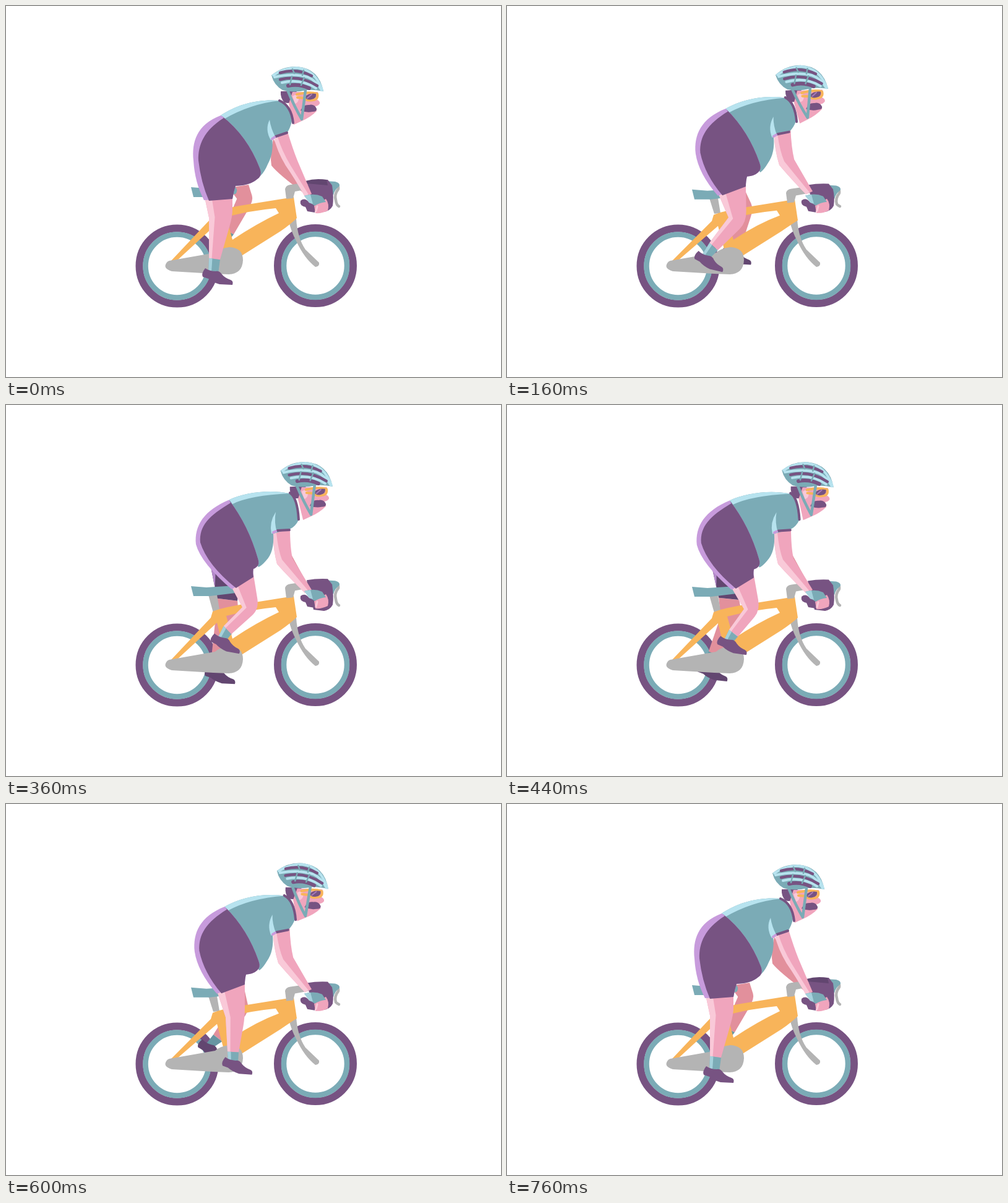
An HTML page with a canvas for the animation above (0.8 s loop, 800 px wide and 600 px high).

```html
<!DOCTYPE html>
<html lang="en">
<head>
<meta charset="utf-8">
<title>Cyclist</title>
<style>
html, body { margin: 0; width: 100%; height: 100%; overflow: hidden; background: #fff; }
canvas { display: block; }
</style>
</head>
<body>
<canvas id="stage" width="800" height="600"></canvas>
<script>
const ctx = document.getElementById('stage').getContext('2d');
const LOOP = 800, STEP = 40, TURN = 760;
const purple = '#775382', dark = '#624670', violet = '#c79bdc', teal = '#7babb6', ice = '#b7e3ef',
  pink = '#f0a5bd', blush = '#f9c9d8', rose = '#e2909c', orange = '#f8b45a', gray = '#b4b4b4';

// time, back of knee, front of knee, ankle, shoe centre, shoe angle
const PEDAL = [
  [0,   328, 342, 366, 340, 337, 409, 341, 437, 0],
  [100, 345, 344, 379, 346, 332, 398, 325, 428, 5],
  [160, 358, 342, 387, 350, 334, 389, 326, 412, 10],
  [240, 370, 334, 399, 344, 345, 375, 335, 393, 15],
  [360, 382, 327, 409, 330, 358, 364, 354, 385, 8],
  [440, 383, 330, 409, 332, 366, 369, 363, 388, 5],
  [520, 380, 335, 406, 335, 371, 380, 368, 398, 0],
  [600, 355, 345, 386, 345, 367, 401, 373, 423, 2],
  [630, 348, 345, 380, 343, 362, 409, 366, 438, 1]
];
PEDAL.push([TURN, ...PEDAL[0].slice(1)]);

const lerp = (a, b, k) => a + (b - a) * k;
const between = (p, q, k) => [lerp(p[0], q[0], k), lerp(p[1], q[1], k)];
const poly = (...points) => 'M' + points.map(p => p.join(' ')).join('L') + 'Z';

// Blends two paths that share the same commands.
function mix(a, b, k) {
  const to = b.match(/-?[\d.]+/g);
  let i = 0;
  return a.replace(/-?[\d.]+/g, n => lerp(+n, +to[i++], k));
}

function fill(color, path, rule) {
  ctx.fillStyle = color;
  ctx.fill(new Path2D(path), rule || 'nonzero');
}

function line(color, width, path) {
  ctx.strokeStyle = color;
  ctx.lineWidth = width;
  ctx.stroke(new Path2D(path));
}

function group(x, y, angle, draw) {
  ctx.save();
  ctx.translate(x, y);
  ctx.rotate(angle * Math.PI / 180);
  draw();
  ctx.restore();
}

function pedalPose(t) {
  t = (t + TURN) % TURN;
  const i = PEDAL.findIndex(row => row[0] > t);
  const a = PEDAL[i - 1], b = PEDAL[i], k = (t - a[0]) / (b[0] - a[0]);
  return a.map((v, j) => lerp(v, b[j], k)).slice(1);
}

function wheel(x, y) {
  for (const [r, w, color] of [[61, 12, purple], [51, 8.6, teal]]) {
    ctx.strokeStyle = color;
    ctx.lineWidth = w;
    ctx.beginPath();
    ctx.arc(x, y, r, 0, 7);
    ctx.stroke();
  }
}

function leg(pose, hemBack, hemFront, far, dx = 0, dy = 0) {
  const [bx, by, fx, fy, ax, ay, sx, sy, angle] = pose;
  const back = [bx + dx, by + dy], front = [fx + dx, fy + dy];
  const mid = between(back, front, .5);
  const len = Math.hypot(ax - mid[0], ay - mid[1]);
  const nx = (ay - mid[1]) / len * 9, ny = (ax - mid[0]) / len * 9;
  const heel = [ax - nx, ay + ny], shin = [ax + nx, ay - ny];
  const sockBack = [sx - 14, sy - 4], sockFront = [sx + 2, sy - 4];
  const low = between(front, shin, .25), high = between(front, hemFront, .3);
  fill(far ? rose : pink,
    `M${hemBack}L${back}L${heel}L${shin}L${low}Q${front} ${high}L${hemFront}Z`);
  fill(far ? '#6795a2' : teal, poly(heel, shin, sockFront, sockBack));
  if (!far) {
    fill(blush, poly(hemBack, back, heel, between(heel, shin, .25),
      between(back, front, .25), between(hemBack, hemFront, .25)));
    fill('#a5d1dc', poly(heel, between(heel, shin, .3), between(sockBack, sockFront, .3), sockBack));
  }
  group(sx, sy, angle, () => fill(far ? dark : purple,
    'M-19 -13Q-12 -8 -2 -8Q4 -9 8 -3Q13 3 22 6Q27 8 25 14L4 13Q-7 10 -14 4L-23 1Q-26 -4 -19 -13Z'));
}

function bike(dip) {
  const y = v => v + 4 * dip;
  fill(gray, `M457 347L469 344Q471 375 484 394L506 415Q507 421 500 422Q482 408 469 380Q460 363 457 347Z`);
  fill(gray, `M327 ${y(307)}L341 ${y(307)}L345 ${y(331)}L335 336Z`);
  fill(orange, `M334 ${y(334)}Q345 ${y(329)} 378 ${y(323)}L465 ${y(309)}L470 ${y(343)}Q460 353 444 364L379 405
    L352 397L341 ${y(352)}L277 411L266 413L331 ${y(344)}Z
    M356 ${y(341)}Q395 ${y(331)} 436 ${y(327)}L441 ${y(335)}Q405 352 366 378Z`, 'evenodd');
  fill(gray, 'M264 412L338 399Q345 392 361 390Q383 391 383 411Q382 433 360 434L335 433L268 429Q255 425 258 418Q260 413 264 412Z');
  fill(teal, `M299 ${y(293)}L324 ${y(295)}L370 ${y(292)}Q376 ${y(298)} 371 ${y(304)}L330 ${y(309)}L303 ${y(309)}Z`);
}

function handlebar(dip, double) {
  const y = v => v + 7 * dip;
  fill(gray, `M453 ${y(312)}L451 ${y(296)}Q452 ${y(290)} 460 ${y(289)}L488 ${y(285)}L489 ${y(296)}L467 ${y(300)}L464 ${y(311)}Z`);
  line(gray, 4.5, `M531 ${y(291)}Q538 ${y(288)} 537 ${y(296)}Q530 ${y(305)} 533 ${y(314)}Q534 322 538 324`);
  fill(teal, `M516 ${y(283)}L532 ${y(284)}Q540 ${y(286)} 539 ${y(291)}Q531 ${y(297)} 529 ${y(306)}Z`);
  fill(purple, `M486 ${y(283)}Q503 ${y(280)} 520 ${y(281)}L527 ${y(290)}Q530 310 528 323Q524 331 514 333L497 331Z`);
  if (double) fill(dark, `M484 ${y(283)}Q500 ${y(278)} 518 ${y(281)}L520 ${y(290)}L486 ${y(287)}Z`);
}

function hand(lift) {
  group(0, lift, 0, () => {
    fill(purple, 'M476 315Q483 309 490 318L500 322L499 334L487 332L484 325Q474 323 476 315Z');
    fill(pink, 'M498 323L517 312Q523 320 520 331Q510 336 500 335Z');
    line(blush, 3, 'M503 324L501 332');
    fill(teal, 'M482 307Q498 302 511 308L517 317Q507 318 499 323L491 318Z');
    fill('#a5d1dc', 'M482 307L492 305L496 320L490 318Z');
  });
}

function head() {
  fill(purple, 'M444 138L470 137L466 152Q460 159 450 156Q443 149 444 138Z');
  fill(pink, 'M463 139L504 139L502 151Q508 154 507 158Q504 162 500 162L502 170Q492 180 478 186L465 192L457 158Z');
  fill(blush, 'M463 146Q470 141 473 147Q474 156 467 158Z');
  line(orange, 4, 'M470 143Q490 138 503 142Q505 151 496 152Q486 154 483 149L471 148');
  fill(purple, 'M483 147Q490 140 501 142Q502 150 494 151Q486 153 483 147Z');
  line('#a77bb9', 2, 'M487 149L494 143');
  fill(purple, 'M476 169Q480 159 490 160Q498 158 502 166Q503 171 495 171Q486 173 476 169Z');
  line(teal, 4.5, 'M455 136Q466 163 478 183L484 136');
  fill(teal, 'M429 112Q447 97 470 98Q506 101 513 138Q498 135 486 136Q465 141 447 136Q433 128 429 112Z');
  line(purple, 6, 'M456 129Q473 125 490 133');
  line(ice, 4, 'M432 112Q449 100 470 100Q500 103 511 136M434 115Q464 108 488 115Q502 121 510 136M446 124Q477 117 501 133');
  line(purple, 4.5, 'M443 108Q470 100 494 113M443 119Q474 111 503 129');
  line(teal, 2.5, 'M463 102L466 109M481 104L479 112M462 114L459 127M482 116L477 128');
}

function draw(t) {
  const swing = Math.sin(Math.PI * t / TURN) ** 2;
  const dip = Math.sin(2 * Math.PI * t / TURN) ** 2;
  const lean = swing ** .8;
  const tuck = swing ** .55;
  const bend = 1 - (1 - swing) ** 4;
  const body = (a, b) => mix(a, b, lean);
  const arm = (a, b) => mix(a, b, bend);

  ctx.fillStyle = '#fff';
  ctx.fillRect(0, 0, 800, 600);
  ctx.lineCap = ctx.lineJoin = 'round';

  wheel(276.5, 420.5);
  wheel(500, 420);

  // Far limbs
  fill(rose, arm('M432 215Q426 240 429 258Q440 272 482 303L490 295L455 250Z',
    'M440 215Q442 240 444 250Q450 268 484 300L490 295L460 240Z'));
  const farBack = between([360, 294], [341, 313], swing);
  const farFront = between([378, 285], [374, 317], swing);
  leg(pedalPose(t + TURN / 2), farBack, between([392, 289], [374, 317], swing), true,
    -9 + 17 * swing, -16 * (1 - swing));
  const hip = between([330, 250], [331, 262], swing);
  fill(dark, poly(hip, farBack, farFront, [378, 265]));
  fill('#b48aca', poly(hip, between(hip, farBack, .65), [hip[0] + 8, hip[1]]));

  bike(dip);
  handlebar(dip, bend < .5);

  // Near leg
  leg(pedalPose(t), between([321, 309], [364, 293], lean), between([366, 306], [400, 274], tuck));

  group(470 + 15 * swing ** .8, 160 - 6 * swing, -2.4 * Math.sin(2 * Math.PI * t / TURN), () => {
    ctx.translate(-470, -160);
    head();
  });

  // Near arm, under the sleeve
  fill(pink, arm('M432 205L454 200Q463 230 471 250L494 304L483 308Q466 278 452 258Q438 235 432 205Z',
    'M431 200L459 198Q459 230 463 248L494 299L483 304Q450 271 438 257Q432 235 431 200Z'));
  fill(blush, arm('M432 210L438 209Q446 235 460 258L489 305L483 308Q466 278 452 258Q438 235 432 210Z',
    'M431 208L437 207Q440 235 446 250L489 301L483 304Q450 271 438 257Q432 235 431 208Z'));

  // Jersey
  fill(teal, body('M347 177C372 160 405 150 443 153Q460 164 462 186Q460 196 455 204L430 214Q433 238 423 256Q418 268 411 275L370 240Z',
    'M361 153C385 142 425 136 458 143Q472 155 473 186Q468 196 460 200L432 208Q434 238 420 252Q413 260 408 262L380 225Z'));
  fill(ice, body('M347 177C372 160 405 150 443 153Q395 158 352 183Z',
    'M361 153C385 142 425 136 458 143Q395 146 366 160Z'));
  fill(ice, body('M426 184Q418 200 428 217L435 211Q428 198 426 184Z',
    'M436 173Q425 190 429 208L438 206Q433 190 436 173Z'));
  line(purple, 4, body('M436 211L454 205', 'M439 203L458 202'));
  line(violet, 4, body('M430 215L434 212', 'M432 206L436 204'));
  line(purple, 4, body('M442 153Q461 161 464 189', 'M459 142Q471 150 473 185'));

  // Shorts
  const seam = mix('L366 312Q368 300 371 291Q395 290 406 280Q415 274 410 262',
    'L400 278Q399 270 400 265Q403 264 406 261Q410 257 407 248', tuck);
  const waist = body('Q390 210 349 178Z', 'Q392 195 361 154Z');
  fill(violet, body('M347 177C308 192 300 220 303 250Q305 285 320 314',
    'M361 153C320 170 304 195 307 225Q315 255 365 298') + seam + waist);
  fill(purple, body('M352 181C320 201 310 225 311 250Q315 285 328 315',
    'M363 158C328 179 312 195 314 222Q325 258 372 296') + seam + waist);

  hand(-6 * swing ** 3);
}

function tick(now) {
  draw(Math.floor(now % LOOP / STEP) * STEP);
  requestAnimationFrame(tick);
}
requestAnimationFrame(tick);
</script>
</body>
</html>
```
